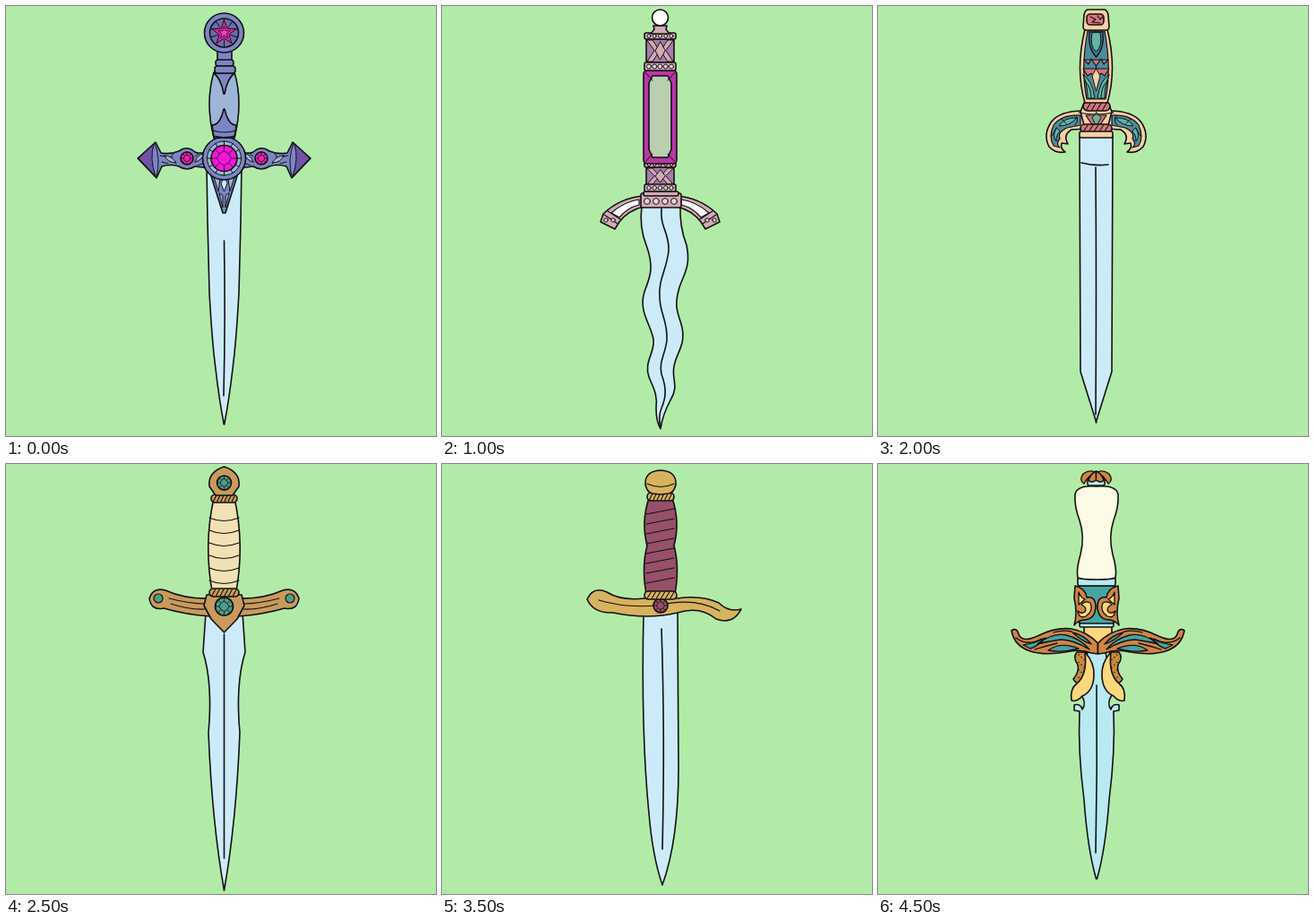
An HTML page for the animation above (5000 ms loop, 480 by 480 pixels).

```html
<!DOCTYPE html>
<html lang="en">
<head>
<meta charset="utf-8">
<title>Daggers</title>
<style>
html, body { margin: 0; width: 100%; height: 100%; overflow: hidden; background: #b2eba8; }
svg { display: block; width: 100%; height: 100%; }
svg > g { visibility: hidden; stroke: #111; stroke-linejoin: round; stroke-linecap: round; }
</style>
</head>
<body>
<svg id="stage" viewBox="0 0 480 480"></svg>
<script>
const ICE = '#cdeaf8', MID = 243.5, HOLD = 500, LINE = 1.6;

// Drawing helpers, all returning SVG markup
const path = (d, fill = 'none', w = LINE) => `<path d="${d}" fill="${fill}" stroke-width="${w}"/>`;
const oval = (x, y, rx, ry, fill = 'none', w = LINE) =>
  `<ellipse cx="${x}" cy="${y}" rx="${rx}" ry="${ry}" fill="${fill}" stroke-width="${w}"/>`;
const disc = (x, y, r, fill, w) => oval(x, y, r, r, fill, w);
const box = (x, y, x2, y2, fill, r = 2, w = LINE) =>
  `<rect x="${x}" y="${y}" width="${x2 - x}" height="${y2 - y}" rx="${r}" fill="${fill}" stroke-width="${w}"/>`;
const both = (art, cx = MID) => `${art}<g transform="matrix(-1 0 0 1 ${2 * cx} 0)">${art}</g>`;
const repeat = (n, fn) => Array.from({ length: n }, (_, i) => fn(i)).join('');

// Closes a left-hand outline with its mirror image
function sym(half, fill, cx = MID, w = LINE) {
  const segs = half.match(/[MLQC][^MLQC]*/g)
    .map(s => [s[0], s.slice(1).trim().split(/\s+/).map(Number)]);
  const last = segs[segs.length - 1][1].slice(-2);
  let d = `${half}L${2 * cx - last[0]} ${last[1]}`;
  for (let i = segs.length - 1; i > 0; i--) {
    const pts = [...segs[i - 1][1].slice(-2), ...segs[i][1].slice(0, -2)];
    d += segs[i][0];
    for (let j = pts.length - 2; j >= 0; j -= 2) d += `${2 * cx - pts[j]} ${pts[j + 1]} `;
  }
  return path(d + 'z', fill, w);
}

const polar = (x, y, r, turn) => {
  const a = (turn - 0.25) * 2 * Math.PI;
  return `${(x + r * Math.cos(a)).toFixed(1)} ${(y + r * Math.sin(a)).toFixed(1)}`;
};
const rays = (x, y, r1, r2, n, w = 1) =>
  path(repeat(n, i => `M${polar(x, y, r1, i / n)}L${polar(x, y, r2, i / n)}`), 'none', w);
const star = (x, y, r1, r2, n, fill, w = 1) =>
  path('M' + Array.from({ length: 2 * n }, (_, i) => polar(x, y, i % 2 ? r2 : r1, i / n / 2)).join('L') + 'z', fill, w);
const gem = (x, y, r, fill) =>
  disc(x, y, r, fill) + star(x, y, r * .55, r * .5, 4, 'none', .8) + rays(x, y, r * .55, r, 8, .8);
const rope = (x, y, x2, y2, fill, n = 7) => {
  const step = (x2 - x) / n;
  return box(x, y, x2, y2, fill, (y2 - y) / 2) +
    path(repeat(n - 1, i => `M${x + step * (i + .6)} ${y2 - 1}L${x + step * (i + 1.4)} ${y + 1}`), 'none', 1.1);
};
const beads = (x, x2, y, n, r, fill) => repeat(n, i => disc(x + (x2 - x) * i / (n - 1), y, r, fill, 1));

function starDagger() {
  const blue = '#7c86c4', pale = '#9db6d8', violet = '#6c55a9', pink = '#f514dc';
  return sym('M224 178L225 240L227 320Q230 375 234 405Q238 440 243.3 467', ICE) +
    path('M243.5 262Q245 350 243 435') +
    sym('M227 182L230 193L242 231', blue) +
    both(path('M232 191L237 207 239 193zM238 209L242 225 242 212z', pale, 1)) +
    path('M243.5 191L240 198 243.5 207 247 198z', ICE, 1) +
    both(
      path('M226 162Q215 166 211 163Q202 155 193 162Q183 166 173 164L167 152 147 170 168 192 174 179Q184 176 193 179Q202 185 211 179L226 181z', blue) +
      path('M165 154L148 170 167 190Q160 171 165 154z', violet, 1) +
      path('M166 153Q173 171 168 191M172 167Q179 167 183 173M187 165Q181 168 190 176M174 174L181 176', 'none', 1) +
      path('M177 167Q185 167 190 175Q180 175 177 167zM211 174Q214 165 221 165Q218 173 211 174z', pale, 1) +
      gem(202, 170, 7, '#ee1fb5') + path('M211 168L216 164M214 178L222 175', 'none', 1)) +
    disc(MID, 170, 24, blue) + disc(MID, 170, 19, pale, 1) + rays(MID, 170, 14, 19, 12) + gem(MID, 170, 14.5, pink) +
    sym('M232 74Q222 108 232 147', pale) +
    sym('M232 75Q240 81 243 98', blue) + sym('M243 115Q239 133 230 133L232 147', blue) +
    path('M231 139Q243 143 257 139M232 145Q243 148 256 145', 'none', 1.1) +
    box(236, 48, 252, 62, blue) + box(234, 60, 254, 67, blue, 3) + box(233, 67, 256, 75, blue, 3) +
    disc(MID, 30, 22, blue) + disc(MID, 30, 16, '#6b6cab') + rays(MID, 30, 8, 16, 10) +
    star(MID, 30, 14, 6, 5, '#e824af') + star(MID, 30, 7, 3, 5, '#f03cc0', .8);
}

function scrollDagger() {
  const peach = '#fed8b6', purple = '#c04fc0', steel = '#9fbee6', cx = 244.8;
  const leaf = 'M225 64Q220 49 236 41Q245 52 225 64zM229 66Q232 50 246 44Q257 53 229 66zM243 65Q248 51 261 44Q270 55 243 65z';
  return sym('M218.5 199Q219 260 222 310Q225 375 231 415Q236 447 243 471', ICE, 244) +
    // etched blade: outer band, then the pale column with its steel inlays
    sym('M225 205Q226 217 235 222Q228 223 227 229Q233 236 231 242Q226 250 229 257Q236 262 232 273Q227 280 231 287Q237 294 233 305Q229 312 232 320Q240 328 235 340Q231 348 235 355Q241 364 236 377Q233 384 238 392Q242 401 238 412Q237 423 241 431L243.5 444', steel, 244, 1.5) +
    sym('M231 207Q228 213 233 217Q238 215 239 221Q242 225 244 219', ICE, 244, 1.5) +
    sym('M239 229Q236 238 239 245L244 251L244 234', ICE, 244, 1.5) +
    sym('M244 256Q240 262 241 268Q234 273 235 280L240 285Q239 295 233 302L238 311Q240 317 235 325Q235 334 241 340Q242 348 236 356Q236 366 241 374L244 391', ICE, 244, 1.5) +
    sym('M244 266Q241 272 243 278Q238 287 242 295Q235 304 241 314L244 320', steel, 244, 1.4) +
    sym('M244 324Q239 331 244 343', steel, 244, 1.4) + sym('M244 350Q239 359 244 372', steel, 244, 1.4) +
    path('M243.5 405Q238 400 239 396Q243 393 243.5 397Q245 393 248 396Q249 400 243.5 405z', ICE, 1.3) +
    oval(MID, 420, 2.3, 5, ICE, 1.3) +
    both(repeat(7, i => i % 3 === 1
      ? oval(224 + i, 211 + i * 25, 2.3, 6, ICE, 1.3)
      : disc(224 + i, 211 + i * 25, 2, ICE, 1.3) + disc(224.5 + i, 222 + i * 25, 1.6, steel, 1.2)), 244) +
    both(
      path('M186 176Q173 182 175 195Q176 206 183 213Q188 222 185 233Q180 228 171 229Q158 232 158 246Q160 260 176 260Q193 258 199 241Q203 225 203 203L208 197z', peach) +
      path('M182 242Q180 235 172 236Q164 238 165 246Q169 253 177 249Q181 244 176 241Q171 241 172 245', 'none', 1.3) +
      path('M179 186Q188 211 200 222M184 185Q199 198 203 214M177 197Q190 207 195 234M190 190Q197 203 204 207M187 217Q195 235 186 251M181 205L190 216', 'none', 1.3), cx) +
    sym('M180 181Q192 167 217 162L244.8 160L244.8 201L205 200Q197 186 180 181', peach, cx) +
    both(path('M188 179Q198 171 214 168L216 195 204 197Q199 186 188 179z', purple, 1.5) +
      path('M193 179Q201 174 211 172L212 190 206 193Q201 184 193 179z', peach, 1.4) +
      path('M196 180L210 176M204 187L209 176', 'none', 1.2), cx) +
    oval(245.5, 180.5, 28, 16.5, '#ff2ec4', 1.8) +
    sym('M229 139L229 151L222 160L243 162', peach) +
    box(229, 139, 259, 154, purple) +
    both(path('M229 152Q229 143 239 140Q244 147 229 152zM235 153Q236 145 243.5 142L243.5 151z', peach, 1.2)) +
    both(path('M231 112Q223 117 226 124Q223 133 231 137z', peach)) +
    box(230.5, 112, 258, 137, ICE) + box(231, 78, 257, 99, ICE) +
    both(path('M231 80Q227 86 231 94', peach)) +
    rope(227, 136, 260, 141, peach) + rope(228, 97, 262, 103, peach) + rope(230, 103, 262, 111, peach) +
    path('M228 41Q222 46 223 58L228 67 262 67Q268 56 265 47L260 41z', purple) +
    path(leaf, peach, 1.4) + path('M228 60L236 46M233 62L245 49M247 62L259 49', 'none', 1.2) +
    rope(224, 65, 264, 71, peach) + rope(226, 71, 262, 78, peach) +
    repeat(5, i => oval(231.5 + i * 6, 30 - (i % 4 ? 1 : 0), 3.6, 6, i % 2 ? purple : peach, 1.4)) +
    box(233, 36, 254, 41, ICE) + disc(MID, 13, 10.5, peach);
}

function waveDagger() {
  const mauve = '#d3abb6', plum = '#a77bab', magenta = '#ba36a8';
  const lattice = (y, h) => box(228, y, 259, y + h, plum) +
    both(path(`M229 ${y + 1}L235 ${y + 1} 243 ${y + h / 2} 235 ${y + h - 1} 229 ${y + h - 1} 237 ${y + h / 2}z`, mauve, 1)) +
    path(`M243.5 ${y + 3}L238 ${y + h / 2} 243.5 ${y + h - 3} 249 ${y + h / 2}z`, mauve, 1);
  const band = (y, h) => box(226, y, 261, y + h, mauve) + beads(231, 256, y + h / 2, 5, h * .28, '#e8d5db');
  return path('M223 223Q220 247 228 267C238 294 231 304 226 319C219 341 233 355 236 372C238 387 225 397 231 414C235 425 241 432 239 449Q239 464 244 472Q246 457 255 440C265 424 256 417 259 402C262 386 272 379 268 359C264 342 258 338 265 314C270 299 278 290 273 267Q265 246 266 223z', ICE) +
    path('M245 226C243 247 254 253 253 273C251 294 241 306 243 326C244 346 252 351 251 373C249 390 242 396 245 411C251 427 250 437 245 449Q241 459 244 470') +
    both(path('M225 212Q199 214 180 232L177 241 193 249 198 241Q208 228 225 224z', mauve) +
      path('M220 216Q204 218 189 231L198 236Q207 225 220 222z', '#fff', 1.2) +
      path('M185 229L199 238M181 233L196 243', 'none', 1.1) + beads(183, 191, 239, 2, 2.2, '#e8d5db')) +
    box(222, 209, 267, 225, mauve) + box(225, 207, 264, 212, mauve) + beads(229, 259, 218, 4, 3.4, '#e8d5db') +
    lattice(180, 20) + band(174, 6) + band(199, 8) +
    box(225, 72, 262, 176, magenta, 4) +
    path('M235 78L252 78 256 86 256 160 252 169 235 169 231 160 231 86z', '#b9cfb0') +
    path('M227 74L235 83M260 74L252 83M227 174L235 165M260 174L252 165', 'none', 1) +
    lattice(37, 26) + band(30, 7) + band(63, 9) +
    sym('M236 22L237 26L233 31', mauve) + disc(MID, 13, 9, '#fff');
}

function ringDagger() {
  const gold = '#e9c27a', rose = '#b9667f', dark = '#6e6388';
  return sym('M225 156L226 300Q228 390 243.5 466', ICE) + path('M243.5 172L243.5 430') +
    both(path('M230 140Q208 143 198 137Q188 139 189 149Q195 159 207 154L230 157z', gold) +
      disc(197, 147, 3.5, rose, 1) + path('M205 147L222 148', 'none', 1.1)) +
    box(224, 136, 263, 160, gold, 4) + gem(MID, 148, 8, rose) +
    sym('M231 35Q221 82 231 137', dark) +
    repeat(7, i => path(`M${228 - 2 * Math.sin(i / 2)} ${58 + i * 11}L${259 + 2 * Math.sin(i / 2)} ${48 + i * 11}`, 'none', 1.2)) +
    rope(229, 30, 258, 38, gold) + rope(228, 130, 259, 138, gold) +
    disc(MID, 18, 13.5, gold) + gem(MID, 18, 8, rose);
}

function tealDagger() {
  const peach = '#fbcfa2', teal = '#4e8c9d', mint = '#66b3a5', red = '#d2777b';
  return sym('M225 145L226 408L243.8 465', ICE) +
    path('M227 175Q242 179 257 177M243 180Q244 320 243 456') +
    both(path('M233 117Q203 116 193 130Q184 144 191 157Q198 165 209 163Q203 159 205 153L212 154Q206 144 216 138L233 137z', peach) +
      path('M226 122Q205 121 196 133Q190 146 196 156L203 158Q198 154 203 148Q200 141 211 136L226 133z', teal, 1.2) +
      path('M222 125Q208 124 202 134Q214 134 222 125zM199 136Q194 145 199 151Q199 143 203 140z', mint, 1) +
      path('M220 133Q225 127 221 123M194 145L199 137M210 131L205 126', 'none', 1)) +
    sym('M230 108L226 118L231 137L243 139', peach) +
    sym('M232 122L240 134L243.5 136', red, MID, 1.2) + path('M243.5 119L239 125 243.5 134 249 125z', mint, 1) +
    path('M224 119Q243 123 263 119', 'none', 1.2) +
    rope(229, 107, 259, 117, red, 5) + rope(226, 132, 261, 141, red, 6) + box(225, 140, 262, 147, peach) +
    sym('M231 26Q220 71 231 108', peach) + sym('M234 28Q226 70 233 104', teal, MID, 1.2) +
    sym('M236 29Q234 47 243.5 57', '#3f7792', MID, 1.2) + sym('M239 30Q236 45 243.5 51', mint, MID, 1) +
    sym('M230 60L235 65L238 59L243.5 67L243.5 83L238 75L234 78L229 70', red, MID, 1.1) +
    both(path('M229 77Q239 82 242 103L234 103Q234 88 229 77z', mint, 1) + path('M231 84Q238 90 238 103', 'none', 1)) +
    sym('M243.5 70L239 78L243.5 95', peach, MID, 1) +
    sym('M243 4L234 4Q231 5 230 10L229 23Q229 27 233 27L243 27', peach) + box(233, 9, 252, 21, red, 4) +
    path('M237 12L243 15 239 18 248 19M245 11L248 15 251 12', 'none', 1.1);
}

function winglikeDagger() {
  const bronze = '#c99a5b', green = '#4f9b86', cream = '#f1e1b5';
  return sym('M223 166L220 210Q231 245 226 300Q230 400 243.5 476', ICE) + path('M243.5 190L243.5 440') +
    both(path('M228 150Q200 151 178 141Q164 137 160 150Q162 164 176 161Q200 168 228 170z', bronze) +
      disc(170, 150, 5, green, 1.2) + path('M182 150Q205 156 222 156M184 156Q205 163 222 162', 'none', 1.1)) +
    sym('M224 146L221 158L229 173L243.5 188', bronze) + gem(MID, 159, 10, green) +
    sym('M232 38Q220 92 231 147', cream) +
    repeat(6, i => path(`M227 ${60 + i * 14}Q243 ${67 + i * 14} 260 ${60 + i * 14}`, 'none', 1.2)) +
    rope(229, 34, 258, 43, bronze) + rope(227, 139, 260, 148, bronze) +
    sym('M243.5 3Q225 9 227 25L234 35L243.5 35', bronze) + gem(MID, 21, 8, green);
}

function cameoDagger() {
  const rose = '#c47e7b', tan = '#e3a17e', cx = 244;
  const curl = (x, y, s = 1) => path(`M${x - 6 * s} ${y + 5}Q${x - 7 * s} ${y - 5} ${x} ${y - 4}Q${x + 5 * s} ${y + 1} ${x - s} ${y + 3}Q${x - 4 * s} ${y} ${x} ${y - 1}`, 'none', 1.1);
  return sym('M228 178L229 300Q230 400 236 437Q239 454 244.3 466', ICE, 245.5) +
    path('M230 221L245 226 260 223M245 230Q246 350 244 454') +
    both(path('M224 159L191 159Q185 150 175 149Q180 168 174 186Q185 186 191 175L224 176z', rose) +
      path('M192 163L221 163M192 171L221 171', 'none', 1.1) + box(195, 165, 219, 169, tan, 1, 1) +
      path('M178 153Q187 155 190 163L190 172Q185 181 178 182Q183 167 178 153z', tan, 1) +
      curl(186, 162) + path('M182 179Q188 175 185 171Q181 171 183 175', 'none', 1.1), 245) +
    sym('M224 153L222 166L225 178L230 180L245 181', rose, 245) +
    both(path('M244 154Q241 164 245 172Q238 172 233 164Q235 158 244 154M232 155Q224 159 229 164L237 159zM227 168Q232 176 238 176L230 166z', tan, 1.1), 245) +
    box(228, 134, 259, 152, rose, 4) + beads(232, 255, 143, 4, 3.6, tan) + star(244, 143, 6, 3, 6, tan) +
    path('M229 138Q244 141 258 138M229 149Q244 152 258 149', 'none', 1) +
    sym('M230 35Q221 60 223 92Q227 113 228 130Q231 137 244 136', rose, cx) +
    sym('M232 39Q229 48 231 52Q237 53 244 49', tan, cx, 1) + both(curl(237, 45), cx) +
    sym('M229 106Q230 124 233 130L244 130', tan, cx, 1) + both(curl(238, 124), cx) +
    path('M244 110L240 118 244 129 248 118z', rose, 1) +
    oval(243.5, 81, 17, 30, tan) + oval(243.5, 81, 13.5, 27, rose, 1.1) +
    path('M247 55Q231 57 230 79Q230 98 239 107Q246 109 251 104Q241 94 242 82Q242 69 250 64Q256 67 257 77Q258 60 247 55z', '#efba87', 1.1) +
    path('M246 58Q235 66 235 82Q235 96 243 105M250 61Q239 69 239 85Q239 96 247 104M247 75L250 74M254 75L256 76M252 76L254 86 250 87', 'none', 1) +
    path('M247 94Q250 91 254 94Q250 98 247 94z', '#a84f58', 1) +
    rope(230, 29, 258, 36, rose, 4) +
    sym('M244 5Q232 6 227 17Q226 23 232 29L244 29', rose, cx) +
    path('M228 19Q244 15 260 19M230 23Q244 20 258 23', 'none', 1.1) + both(curl(238, 12), cx);
}

function curvedGuardDagger() {
  const brass = '#d8b25e', wine = '#96506a', grey = '#aab4c6';
  return path('M225 166Q222 300 231 390Q235 438 246 470Q264 420 264 340L263 166z', ICE) +
    path('M245 184Q249 300 246 430') +
    path('M226 150Q200 153 184 143Q169 136 162 151Q169 167 191 166Q230 174 263 166Q288 158 306 173Q325 180 334 162Q320 166 309 155Q289 146 263 150z', brass) +
    path('M175 152Q205 161 240 158Q282 148 310 164', 'none', 1.2) + gem(244, 158, 8, wine) +
    sym('M231 38Q222 65 229 91Q222 118 229 150', wine, 244) +
    repeat(8, i => path(`M228 ${56 + i * 11}L259 ${50 + i * 11}`, grey, 1.2)) +
    rope(229, 32, 259, 41, brass) + rope(226, 142, 262, 151, brass) +
    sym('M244 7Q226 8 227 23Q229 32 235 33L244 34', brass, 244) + path('M229 22Q244 29 259 22', 'none', 1.2);
}

function wolfDagger() {
  const fur = '#c37b79', peach = '#efb78c', dark = '#7d4b50';
  const tuft = (x, y) => path(`M${x} ${y}Q${x + 1} ${y + 6} ${x + 3} ${y + 6}Q${x + 6} ${y + 5} ${x + 6} ${y}`, 'none', 1.1);
  const strip = (x, y, dx, dy) => path(`M${x} ${y}L${x + 5} ${y - 2} ${x + dx} ${y + dy} ${x + dx - 4} ${y + dy + 3}z`, peach, 1.1);
  return path('M220 170Q223 330 229 462Q245 456 254 425Q264 385 263 300L265 170z', ICE) +
    path('M262 182L254 202Q253 250 253 340Q251 399 244 436') +
    path('M198 174Q204 161 218 157Q247 160 273 158Q294 166 326 164Q313 171 298 174Q278 171 255 173Q226 169 198 174z', '#aaa5ae') +
    path('M219 70Q221 108 219 139L265 137Q267 101 260 70z', dark) +
    repeat(4, i => strip(222, 82 + i * 16, 34, 15) + strip(253 - i % 2 * 5, 78 + i * 14, -25, 22)) +
    strip(238, 75, 23, 25) + strip(221, 111, 27, 25) + strip(259, 106, -19, 31) +
    path('M222 88L229 105M246 80L256 94M234 104L224 128M260 120L247 135', 'none', 1.1) +
    path('M221 137Q217 146 220 158L264 158 265 136Q243 142 221 137z', fur) +
    repeat(3, i => path(`M220 ${143 + i * 5}Q242 ${149 + i * 5} 264 ${142 + i * 5}`, 'none', 1.2)) +
    path('M218 75L220 67 216 62 218 52 215 41Q202 36 198 29Q203 24 216 28Q201 22 199 13Q214 8 231 22Q244 22 251 18L260 24 282 23Q288 27 287 37L284 42Q273 36 264 38Q259 48 265 56L275 58 279 55Q281 64 272 66Q261 68 260 76Q238 70 218 75z', fur) +
    path('M205 15Q219 16 226 28Q212 27 205 15z', '#77678f', 1.1) +
    path('M266 39L268 44 271 38M274 38L277 45 280 40M283 41L284 46 287 39M266 56L268 52 270 57M274 58L277 52 279 57', '#fff', 1.1) +
    path('M244 34Q251 27 258 34Q251 40 244 34z', '#eec1a1', 1.1) + disc(252, 34, 2.5, '#d9847e', 1) +
    path('M243 30Q250 24 258 28M279 25Q281 30 287 29M260 31L272 31M261 39Q256 47 260 55', 'none', 1.1) +
    repeat(11, i => tuft(219 + i % 4 * 9 + (i >> 2) % 2 * 4, 42 + (i >> 2) * 10)) + tuft(231, 30) + tuft(223, 32);
}

function ivoryDagger() {
  const orange = '#d18544', teal = '#46a5a2', yellow = '#fdd77c', sky = '#b9e9f1', cx = 245.5;
  return sym('M234 209L227 258Q233 267 228 274Q226 267 219 269L219 275L225 276Q223 320 230 375Q234 430 243.5 463', sky, 244) +
    path('M244 247Q245 340 243 434') +
    both(path('M222 210Q217 216 223 224Q225 232 218 240Q221 247 231 243Q236 227 232 210z', '#c58b3c') +
      repeat(10, i => disc(224 + i % 3 * 3, 213 + i * 2.8, .5, '#754c20', .4)) +
      path('M231 210Q242 222 241 237Q240 254 228 259Q222 266 216 264Q214 251 222 245Q234 235 231 210z', yellow), cx) +
    sym('M230 180L230 192L245.5 209', yellow, cx) +
    both(path('M149 186Q155 182 157 190Q161 200 178 192Q198 182 216 184Q233 187 245.5 200L245.5 212L238 211Q226 206 209 210Q186 214 170 209Q152 203 149 186z', orange) +
      path('M178 201Q195 188 210 191Q226 195 236 207Q218 196 204 196Q190 198 178 201zM162 202Q176 200 187 194Q178 204 170 206z', teal, 1.3) +
      path('M190 208Q204 198 224 206Q206 211 190 208zM217 188Q230 191 238 201Q228 198 217 188z', teal, 1.3) +
      path('M154 194Q166 204 183 195M196 188Q206 185 216 187M175 207Q188 203 200 200', 'none', 1.3), cx) +
    box(225, 177, 263, 182, sky) + sym('M224 136L225 178L244 178', teal, 244) +
    both(path('M220 136Q232 139 233 149Q243 147 243 160Q242 174 229 174Q223 175 219 180Q223 166 219 150z', orange) +
      path('M224 143Q226 149 231 151L224 157zM227 157Q231 152 237 155Q241 164 232 170Q224 173 223 164Q227 168 231 165Q234 160 227 157z', yellow, 1.3), 244) +
    box(223, 127, 265, 136, sky) +
    sym('M244 25Q222 23 220 34Q219 47 225 63Q231 81 226 101Q221 118 223 127Q227 129 244 129', '#fdfae5', 244) +
    box(234, 16, 253, 24, sky) +
    both(path('M230 22Q224 18 229 11Q236 6 242 9Q234 14 230 22zM235 18Q238 10 243.5 8L243.5 18Q238 22 235 18z', orange, 1.4));
}

const stage = document.getElementById('stage');
stage.innerHTML = [starDagger, scrollDagger, waveDagger, ringDagger, tealDagger, winglikeDagger,
  cameoDagger, curvedGuardDagger, wolfDagger, ivoryDagger].map(draw => `<g>${draw()}</g>`).join('');
const daggers = [...stage.children];
const start = performance.now();

function show(now) {
  const current = Math.floor(Math.max(0, now - start) / HOLD) % daggers.length;
  daggers.forEach((g, i) => { g.style.visibility = i === current ? 'visible' : 'hidden'; });
  requestAnimationFrame(show);
}
show(start);
</script>
</body>
</html>
```
